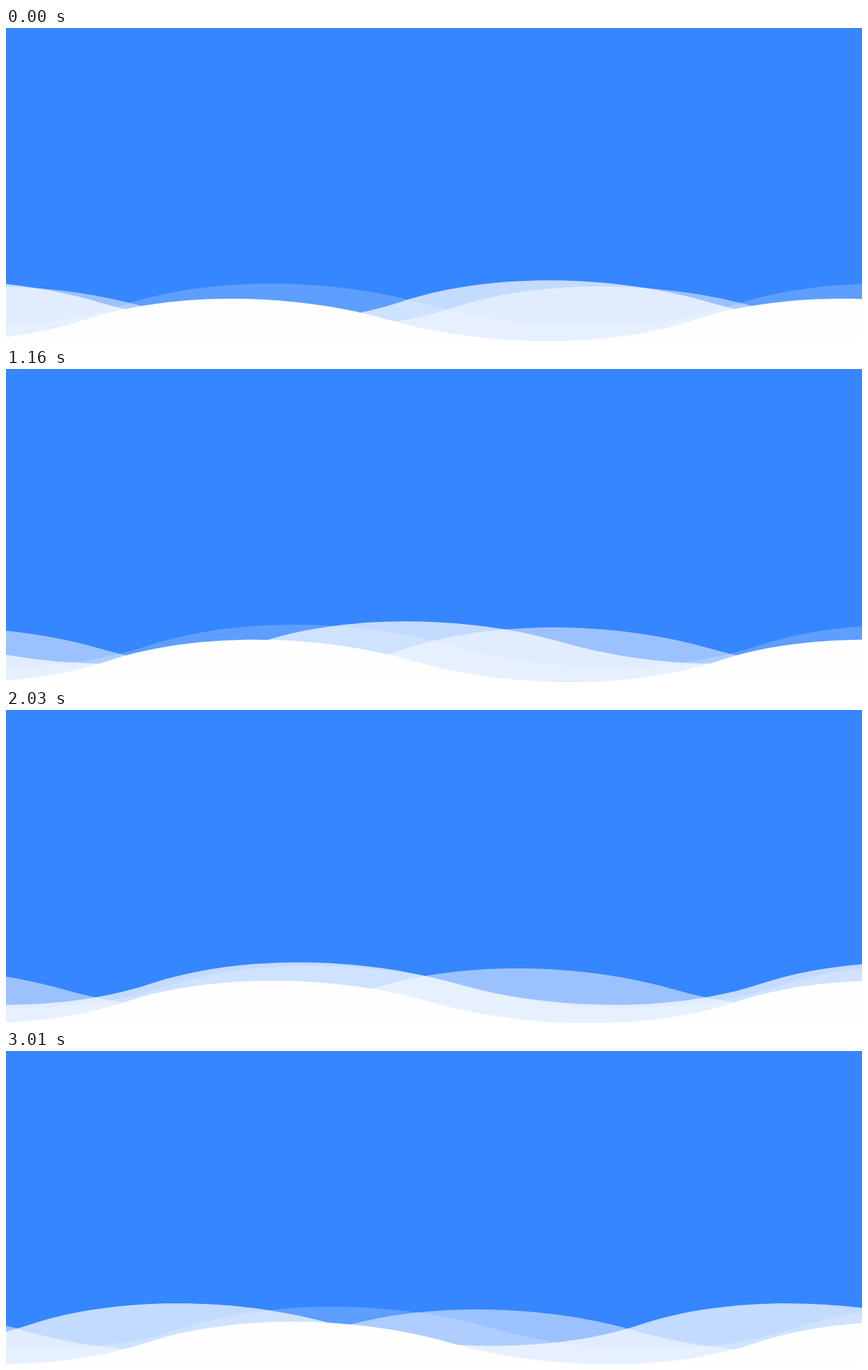
Animation, 1237 px wide and 453 px high, one loop 3.09 s. Source, as an HTML page:

```html
<!DOCTYPE html>
<html lang="en">
<head>
<meta charset="utf-8">
<title>Waves</title>
<style>
  html, body { margin: 0; width: 100%; height: 100%; overflow: hidden; background: #3686ff; }
  svg { display: block; width: 1237px; height: 453px; }
</style>
</head>
<body>
<svg viewBox="0 0 1237 453"></svg>
<script>
  const LOOP = 3090, PERIOD = 882;

  // x: rising midpoint at time 0, y: mid height, speed: px per ms
  const waves = [
    { x: 170, y: 400.75, speed: 0.0294, fill: '#fff', alpha: 0.2 },
    { x: 646, y: 404.75, speed: -0.0592, fill: '#fff', alpha: 0.5 },
    { x: 572, y: 396, speed: -0.1785, fill: '#fff', alpha: 0.7 },
    { x: 113, y: 422.5, speed: 0.0294, fill: '#fefefe', alpha: 1 }
  ];

  // One crest and one trough, each half a period wide
  const swell = 'c122 -41 299 -41 441 0c142 41 319 41 441 0';
  const shape = `M${-PERIOD} 0${swell.repeat(3)}V100H${-PERIOD}Z`;

  const svg = document.querySelector('svg');
  for (const w of waves) {
    w.path = document.createElementNS(svg.namespaceURI, 'path');
    w.path.setAttribute('d', shape);
    w.path.setAttribute('fill', w.fill);
    w.path.setAttribute('fill-opacity', w.alpha);
    svg.append(w.path);
  }

  function draw(now) {
    const t = now % LOOP;
    for (const w of waves) {
      w.path.setAttribute('transform', `translate(${w.x + w.speed * t} ${w.y})`);
    }
  }

  const start = performance.now();
  function tick() {
    draw(performance.now() - start);
    requestAnimationFrame(tick);
  }
  tick();
</script>
</body>
</html>
```
